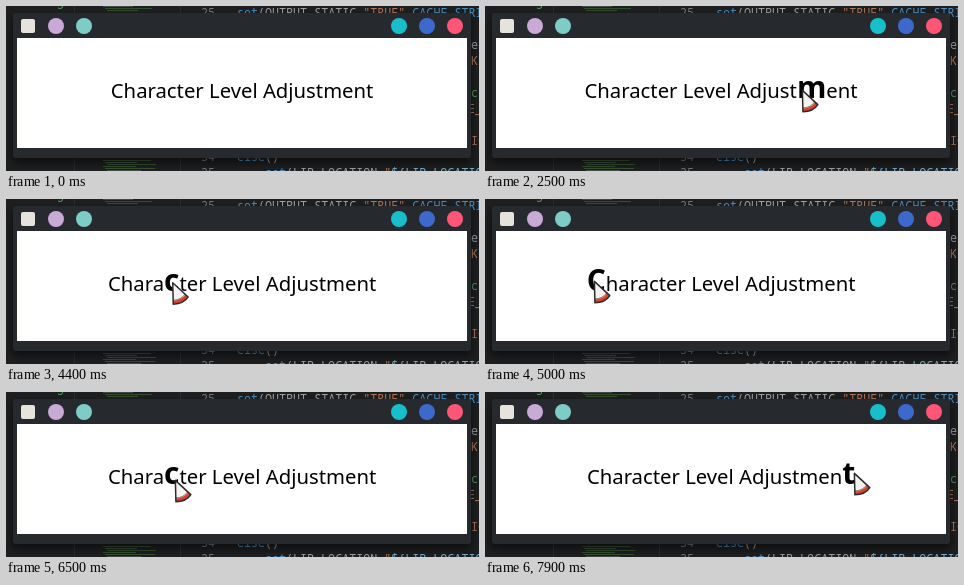
An HTML page that plays this animation: 473x165 px, repeating every 8000 ms.

```html
<!DOCTYPE html>
<html lang="en">
<head>
<meta charset="utf-8">
<title>Character Level Adjustment</title>
<style>
html, body { margin: 0; width: 100%; height: 100%; overflow: hidden; background: #1c1d1f; }
svg { display: block; width: 473px; height: 165px; }
text { white-space: pre; }
.code { font: 11.7px "Noto Sans Mono", monospace; fill: #a0a2a5; }
.fn { fill: #4b8fc4; }
.str { fill: #b5785a; }
.num { fill: #74777b; }
.var { fill: #7fb0cc; }
.note { fill: #4f9a5b; }
#label { font: 20.3px "Noto Sans", sans-serif; text-anchor: middle; fill: #000; }
#hot { font-size: 30px; font-weight: 700; }
</style>
</head>
<body>
<svg viewBox="0 0 473 165">
  <defs>
    <filter id="blur" x="-10%" y="-20%" width="120%" height="140%"><feGaussianBlur stdDeviation="5"/></filter>
  </defs>
  <rect width="473" height="165" fill="#1e1f20"/>
  <path d="M68.5 0V165M174.5 0V165" stroke="#2b2d30"/>
  <g id="minimap"></g>
  <g class="code">
    <text class="note" x="51" y="3">5</text>
    <text class="num" x="195" y="11">25</text>
    <text x="231" y="11"><tspan class="fn">set</tspan>(OUTPUT_STATIC <tspan class="str">"TRUE"</tspan> <tspan class="fn">CACHE</tspan> <tspan class="fn">STRI</tspan></text>
    <text x="465" y="43">e</text>
    <text class="str" x="465" y="59">KE</text>
    <text class="note" x="465" y="91">c</text>
    <text class="str" x="462" y="107">E_</text>
    <text class="str" x="465" y="139">IC</text>
    <text class="num" x="195" y="155">34</text>
    <text x="231" y="155"><tspan class="fn">else</tspan>()</text>
    <text class="num" x="195" y="171">35</text>
    <text x="259" y="171"><tspan class="fn">set</tspan>(LIB_LOCATION <tspan class="str">"</tspan><tspan class="var">${LIB_LOCATIO</tspan></text>
  </g>
  <rect x="6" y="11" width="460" height="146" fill="#000" opacity=".55" filter="url(#blur)"/>
  <rect x="7" y="7" width="458" height="145" rx="3" fill="#262a2f"/>
  <rect x="11" y="32" width="450" height="110" fill="#fff"/>
  <rect x="15" y="13" width="14" height="14" rx="2" fill="#e6e3dc"/>
  <g id="buttons"></g>
  <text id="label" x="236.1" y="92"><tspan id="before"></tspan><tspan id="hot"></tspan><tspan id="after"></tspan></text>
  <g id="cursor" stroke-linejoin="round">
    <path d="M.4 .4L.9 21.8Q11.4 21.6 15.8 14.6Z" fill="#f4f3f1"/>
    <path d="M1 18.6Q9 18.2 13.2 12.2L15.6 14.6Q11.2 21.5 1 21.7Z" fill="#d9412f"/>
    <path d="M1 18Q8.8 17.6 12.8 11.8" fill="none" stroke="#5b3430" stroke-width=".7"/>
    <path d="M.4 .4L.9 21.8Q11.4 21.6 15.8 14.6Z" fill="none" stroke="#2d2a2a" stroke-width="1.5"/>
  </g>
</svg>
<script>
const $ = id => document.getElementById(id);
const TEXT = "Character Level Adjustment";
const LOOP = 8000, STEP = 100, CENTER = 236.1;

// Pointer path: time, x, y
const PATH = [
  [900, 460, 76], [1400, 377, 83], [1600, 365, 86], [1700, 363, 84], [1800, 363, 84],
  [2500, 317, 84], [2700, 297, 85], [2900, 289, 85], [3100, 289, 85],
  [3600, 230, 83], [3900, 195, 84], [4100, 195, 84], [5000, 109, 82], [5200, 109, 82],
  [5500, 98.5, 93], [5600, 98.5, 93], [6500, 169, 88], [6700, 169, 88],
  [7600, 302, 80], [7900, 369, 81], [8000, 369, 81]
];

function add(parent, tag, attrs) {
  const el = document.createElementNS("http://www.w3.org/2000/svg", tag);
  for (const k in attrs) el.setAttribute(k, attrs[k]);
  parent.append(el);
}

[[50, "#c9a9d6"], [78, "#7dcdc6"], [393, "#17bfca"], [421, "#3d69cc"], [449, "#ff5577"]]
  .forEach(([cx, fill]) => add($("buttons"), "circle", { cx, cy: 20, r: 8, fill }));

for (let i = 0; i < 9; i++) {
  const y = i < 3 ? i * 2 : 154 + (i - 3) * 2;
  add($("minimap"), "rect", {
    x: 97 + (i % 3) * 2, y, width: 30 + (i * 17) % 33, height: 1,
    fill: i % 4 ? "#35502f" : "#46484a"
  });
}

const pen = document.createElement("canvas").getContext("2d");
function widths(font) {
  pen.font = font;
  return [...TEXT].map(c => pen.measureText(c).width);
}
const plain = widths('20.3px "Noto Sans", sans-serif');
const bold = widths('700 30px "Noto Sans", sans-serif');
const total = plain.reduce((a, b) => a + b, 0);

function pointer(t) {
  if (t < PATH[0][0]) return null;
  const i = PATH.findIndex(p => p[0] > t);
  const [t0, x0, y0] = PATH[i - 1], [t1, x1, y1] = PATH[i];
  const k = (t - t0) / (t1 - t0);
  let j = i;
  while (j > 1 && PATH[j][1] === PATH[j - 1][1]) j--;
  return { x: x0 + (x1 - x0) * k, y: y0 + (y1 - y0) * k, right: PATH[j][1] > PATH[j - 1][1] };
}

// An enlarged letter keeps the pointer until it leaves its wider box.
function hovered(p) {
  const hits = [];
  let x = CENTER - total / 2;
  for (let i = 0; i < TEXT.length; i++) {
    const left = x - (bold[i] - plain[i]) / 2;
    if (p.x >= left && p.x < left + bold[i]) hits.push(i);
    x += plain[i];
  }
  if (!hits.length) return -1;
  return p.right ? hits[0] : hits[hits.length - 1];
}

function draw(time) {
  const p = pointer(Math.floor(time % LOOP / STEP) * STEP);
  const i = p ? hovered(p) : -1;
  $("before").textContent = i < 0 ? TEXT : TEXT.slice(0, i);
  $("hot").textContent = i < 0 ? "" : TEXT[i];
  $("after").textContent = i < 0 ? "" : TEXT.slice(i + 1);
  $("cursor").setAttribute("visibility", p ? "visible" : "hidden");
  if (p) $("cursor").setAttribute("transform", `translate(${p.x} ${p.y})`);
}

const start = performance.now();
function tick() {
  draw(performance.now() - start);
  requestAnimationFrame(tick);
}
tick();
</script>
</body>
</html>
```
